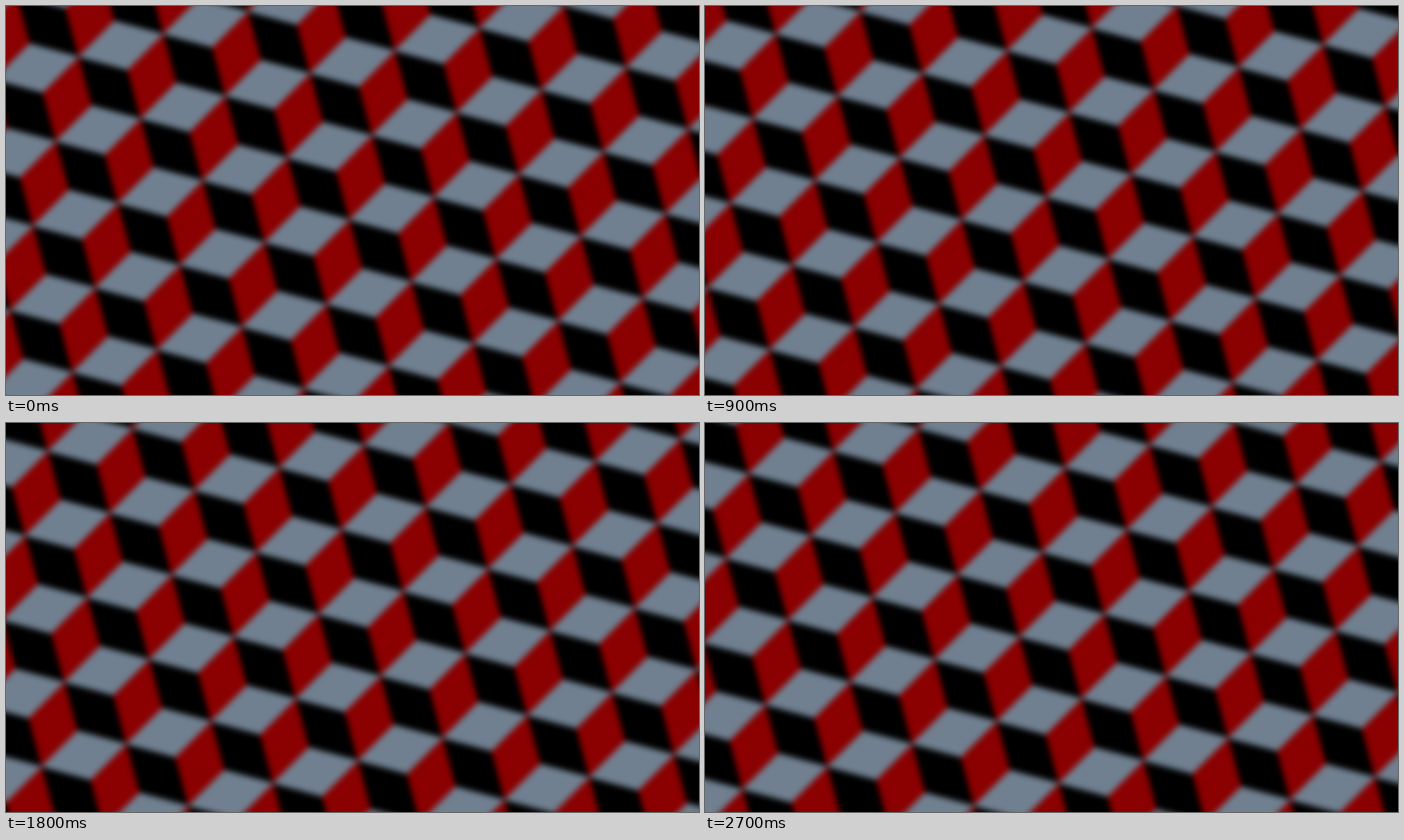
Recreate the animation shown at these times as an HTML page. Size 960 by 540 pixels, loop 3 s.

```html
<!DOCTYPE html>
<html lang="en">
<head>
<meta charset="utf-8">
<title>Tumbling blocks</title>
<style>
  html, body { margin: 0; width: 100%; height: 100%; overflow: hidden; background: #000; }
  #stage { position: relative; width: 960px; height: 540px; overflow: hidden; }
  #slide { position: absolute; left: -40px; top: -40px; animation: sway 3s -1ms infinite; }
  #cubes { display: block; background: #000; filter: blur(4px); }
  #red { fill: #8b0000; }
  #gray { fill: #708090; stroke: #708090; stroke-width: .5; }
  @keyframes sway {
    0% { transform: translateX(0); animation-timing-function: steps(5, end); }
    50% { transform: translateX(-200px); animation-timing-function: steps(5, end); }
    100% { transform: translateX(0); }
  }
</style>
</head>
<body>
<div id="stage">
  <div id="slide">
    <svg id="cubes" width="1260" height="620" viewBox="-40 -40 1260 620">
      <g transform="translate(507 179.4) rotate(-15)">
        <path id="red"/>
        <path id="gray"/>
      </g>
    </svg>
  </div>
</div>
<script>
  const w = 121.5, s = w / Math.sqrt(3);
  const face = (x, y, pts) =>
    'M' + pts.map(([i, j]) => `${(x + i * w / 2).toFixed(2)} ${(y + j * s / 2).toFixed(2)}`).join('L') + 'Z';

  // Cube faces in half-cell units; the left faces are the black ground.
  const lid = [[0, 0], [1, -1], [2, 0], [1, 1]];
  const side = [[1, 1], [2, 0], [2, 2], [1, 3]];

  let grayPath = '', redPath = '';
  for (let row = -6; row <= 8; row++) {
    for (let col = -8; col <= 9; col++) {
      const x = (col + (row & 1) / 2) * w, y = row * 1.5 * s;
      grayPath += face(x, y, lid);
      redPath += face(x, y, side);
    }
  }
  document.getElementById('gray').setAttribute('d', grayPath);
  document.getElementById('red').setAttribute('d', redPath);
</script>
</body>
</html>
```
